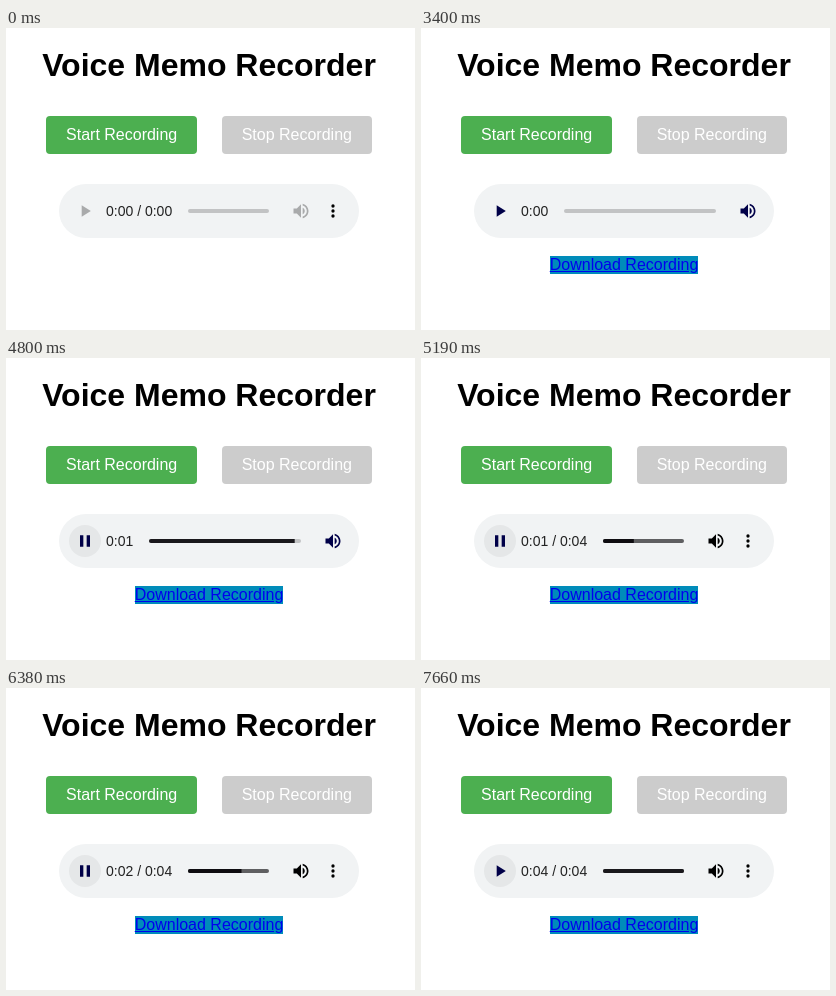
An HTML page with a canvas that plays this animation: 409x302 px, repeating every 8060 ms.

```html
<!DOCTYPE html>
<html lang="en">
<head>
<meta charset="utf-8">
<title>Voice Memo Recorder</title>
<style>
  html, body { margin: 0; width: 100%; height: 100%; overflow: hidden; background: #fff; }
  canvas { position: absolute; left: 0; top: 0; }
  p {
    position: absolute; margin: 0; white-space: pre;
    font: 16px/1 "Liberation Sans", Arial, sans-serif; color: #fff;
  }
  /* The strut puts every baseline exactly 40px below the top. */
  p::before { content: ""; display: inline-block; height: 40px; }
  #title { left: 0; width: 406px; top: 8px; text-align: center; font-size: 32px; font-weight: bold; color: #000; }
  #start { left: 60.06px; top: 72px; }
  #stop { left: 235.66px; top: 72px; }
  #time { left: 100px; top: 148px; font-size: 14px; color: #222; }
  #link { left: 128.75px; top: 202px; color: #00e; text-decoration: underline; }
</style>
</head>
<body>
<canvas id="stage" width="409" height="302"></canvas>
<p id="title">Voice Memo Recorder</p>
<p id="start">Start Recording</p>
<p id="stop">Stop Recording</p>
<p id="time">0:00 / 0:00</p>
<p id="link">Download Recording</p>
<script>
const LOOP = 8060;
const GREEN = '#4caf50', GREY = '#ccc', FADED = '#a9aaab', NAVY = '#000048';
const TRACK = '#c2c3c4', BUFFERED = '#5f5f61', PLAYED = '#1a181c', PLAYED_DEEP = '#0e0c10';
const MID_Y = 183;

const ctx = document.getElementById('stage').getContext('2d');
const timeLabel = document.getElementById('time');
const link = document.getElementById('link');

const icons = {
  play: new Path2D('M8 5v14l11-7z'),
  pause: new Path2D('M6 19h4V5H6zM14 5v14h4V5z'),
  volume: new Path2D('M3 9v6h4l5 5V4L7 9zM16.5 12c0-1.77-1.02-3.29-2.5-4.03v8.05c1.48-.73 2.5-2.25 2.5-4.02z' +
    'M14 3.23v2.06c2.89.86 5 3.54 5 6.71s-2.11 5.85-5 6.71v2.06c4.01-.91 7-4.49 7-8.77s-2.99-7.86-7-8.77z'),
  menu: new Path2D('M14 6a2 2 0 1 1-4 0a2 2 0 1 1 4 0zM14 12a2 2 0 1 1-4 0a2 2 0 1 1 4 0zM14 18a2 2 0 1 1-4 0a2 2 0 1 1 4 0z')
};

// Progress and clock advance in ticks, as a media player reports them.
const ticks = [5060, 5320, 5580, 5850, 6120, 6380, 6600, 6930, 7190, 7460];
const seconds = [4800, 5580, 6600, 7660];
const countPassed = (times, t) => times.filter(at => t >= at).length;

function box(x, y, w, h, r, color) {
  ctx.fillStyle = color;
  ctx.beginPath();
  ctx.roundRect(x, y, w, h, r);
  ctx.fill();
}

function icon(name, centerX, color) {
  ctx.save();
  ctx.translate(centerX - 10, MID_Y - 10);
  ctx.scale(20 / 24, 20 / 24);
  ctx.fillStyle = color;
  ctx.fill(icons[name]);
  ctx.restore();
}

function bar(left, right, played, trackColor, playedColor) {
  box(left, 181, right - left, 4, 2, trackColor);
  if (played > left) {
    box(left, 181, played - left, 4, played < right ? [2, 0, 0, 2] : 2, playedColor);
  }
}

function shortProgress(t) {
  if (t < 3730) return 0;
  if (t < 3990) return 287.5;
  return t < 4800 ? 288.2 : 288.7;
}

function drawPlayer(t) {
  const loaded = t >= 3400, fullLayout = t >= 5060, ended = t >= 7660;
  const playing = t >= 3730 && !ended;

  box(53, 156, 300, 54, 27, '#f1f3f4');
  if (t >= 3530) box(63, 167, 32, 32, 16, '#e5e7e8');
  icon(playing ? 'pause' : 'play', 79, loaded ? NAVY : FADED);

  if (loaded && !fullLayout) {
    bar(143, 295, shortProgress(t), TRACK, PLAYED);
    icon('volume', 327, NAVY);
  } else {
    const played = ended ? 263 : loaded ? 208.31 + 4.53 * countPassed(ticks, t) : 0;
    bar(182, 263, played, loaded ? BUFFERED : TRACK, ended ? PLAYED : PLAYED_DEEP);
    icon('volume', 295, loaded ? '#000' : FADED);
    icon('menu', 327, '#000');
  }

  const total = !loaded ? ' / 0:00' : fullLayout ? ' / 0:04' : '';
  const label = '0:0' + countPassed(seconds, t) + total;
  if (timeLabel.textContent !== label) timeLabel.textContent = label;
}

function render(t) {
  const recording = t >= 70 && t < 3400;
  const downloadable = t >= 3400;

  ctx.clearRect(0, 0, 409, 302);
  box(40, 88, 151, 38, 4, recording ? GREY : GREEN);
  box(216, 88, 150, 38, 4, recording ? GREEN : GREY);
  drawPlayer(t);
  if (downloadable) box(129, 228, 148, 18, 0, '#008cba');
  link.style.visibility = downloadable ? 'visible' : 'hidden';
}

const begin = performance.now();
function loop() {
  render((performance.now() - begin) % LOOP);
  requestAnimationFrame(loop);
}
loop();
</script>
</body>
</html>
```
